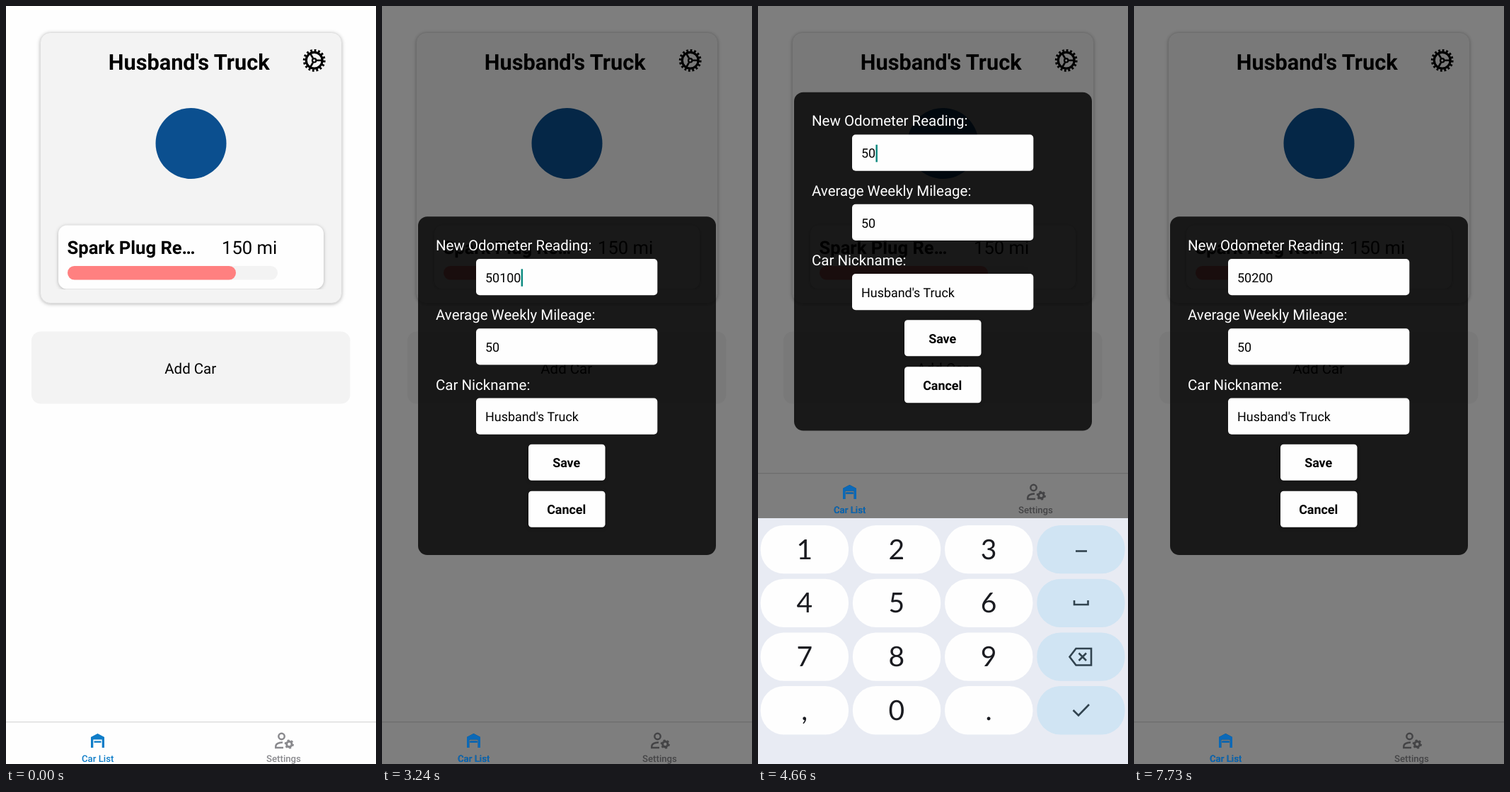
An HTML page for the animation above (8000 ms loop, 523x1070 px).

```html
<!DOCTYPE html>
<html lang="en">
<head>
<meta charset="utf-8">
<title>Car list</title>
<style>
html, body { margin: 0; width: 100%; height: 100%; overflow: hidden; background: #fefefe; }
svg { display: block; width: 100%; height: 100%; font-family: Roboto, sans-serif; text-rendering: geometricPrecision; }
.bold { font-weight: 700; }
.mid { text-anchor: middle; }
.line { fill: none; stroke: currentColor; }
.card { filter: drop-shadow(0 1.5px 2.5px #0004); }
.tab { font-size: 13.2px; font-weight: 500; fill: currentColor; }
.digit { font: 39px Lato, sans-serif; fill: #1a1b20; }
</style>
</head>
<body>
<svg viewBox="0 0 523 1070">
  <defs>
    <clipPath id="listClip"><rect x="68" y="300" width="387" height="100"/></clipPath>
    <g id="garage" class="tab mid">
      <path d="M120 1047V1032L129.5 1027 139 1032V1047H135.7V1035.5H123.3V1047Z"/>
      <path d="M124.5 1037.5h10v2.4h-10z"/>
      <text x="129.7" y="1067.2">Car List</text>
    </g>
  </defs>

  <rect width="523" height="1070" fill="#fefefe"/>
  <rect class="card" x="48.5" y="37.5" width="426" height="382" rx="14" fill="#f3f3f3" stroke="#dedede"/>
  <text class="bold mid" x="258.7" y="89.7" font-size="30.7">Husband's Truck</text>
  <g class="line" transform="translate(435.7 76.8)" stroke-width="3.2">
    <circle r="11.4"/>
    <circle r="14.2" stroke-width="3.4" pathLength="32" stroke-dasharray="1 1"/>
    <circle r="2.7" stroke-width="2.2"/>
    <path d="M3.5 0H11M-1.8 3.1L-5.6 9.7M-1.8 -3.1L-5.6 -9.7" stroke-width="2.6"/>
  </g>
  <circle cx="261.5" cy="194" r="50" fill="#0b4f8f"/>

  <g clip-path="url(#listClip)">
    <rect class="card" x="74" y="309.5" width="375" height="90" rx="12" fill="#fefefe"/>
    <text class="bold" x="86.5" y="350" font-size="25.6">Spark Plug Re…</text>
    <text x="305" y="350" font-size="25.6">150 mi</text>
    <rect x="87" y="367" width="297" height="19.5" rx="9.7" fill="#f3f3f3"/>
    <rect x="87" y="367" width="238" height="19.5" rx="9.7" fill="#ff8080"/>
  </g>

  <rect x="36" y="459.5" width="450.5" height="102" rx="13" fill="#f3f3f3"/>
  <text class="mid" x="260.7" y="518.5" font-size="20.48">Add Car</text>

  <g id="nav">
    <rect y="1010" width="523" height="60" fill="#fefefe"/>
    <rect y="1010" width="523" height="1.4" fill="#dcdcdc"/>
    <use href="#garage" color="#0f7dc8"/>
    <g class="tab mid" color="#8a8a8e">
      <g class="line" stroke-width="2.5">
        <circle cx="389.5" cy="1031" r="4.2"/>
        <path d="M392 1047H381.3V1044.5Q382 1040 391 1039.5"/>
        <circle cx="400.3" cy="1042" r="3.7" stroke-width="3"/>
        <circle cx="400.3" cy="1042" r="5.6" stroke-width="2" pathLength="12" stroke-dasharray="1 1"/>
      </g>
      <text x="392.5" y="1067.2">Settings</text>
    </g>
  </g>

  <rect id="scrim" y="-1" width="523" height="1071" fill="#000" opacity=".5"/>
  <g id="litTab"><use href="#garage" color="#0b69b8"/></g>

  <g id="dialog">
    <rect x="51" width="421" height="477.7" rx="13" fill="#000" opacity=".8"/>
    <g id="form"></g>
    <rect id="caret" y="74" width="2.5" height="24.5" fill="#0b8a80"/>
  </g>

  <g id="keyboard">
    <rect y="723" width="523" height="347" fill="#e8ebf3"/>
    <g id="keys"></g>
    <g class="line" color="#31434f" stroke-width="2.6">
      <path d="M449 769.5H465"/>
      <path d="M447 839V845H466.5V839"/>
      <path d="M449.5 907H471V930.5H449.5L440.5 918.7ZM453.5 913.5L464 924M464 913.5L453.5 924"/>
      <path d="M445.5 994L453 1001.5 468 986"/>
    </g>
  </g>
</svg>
<script>
const $ = id => document.getElementById(id);
const LOOP = 8000, HEIGHT = 1070;

// [time, odometer text]; each entry also restarts the caret blink
const edits = [
  [0, '50100'], [3240, '50100'], [4110, '5010'], [4350, '501'], [4570, '50'],
  [5300, '502'], [5520, '5020'], [5900, '50200']
];
// [key, pressed from, until]
const presses = [
  ['del', 4040, 4190], ['del', 4270, 4430], ['del', 4500, 4660],
  ['2', 5140, 5300], ['0', 5370, 5520], ['0', 5770, 6000]
];

function buildForm() {
  const fields = [['New Odometer Reading:', '50100'], ['Average Weekly Mileage:', '50'], ['Car Nickname:', "Husband's Truck"]];
  const rows = fields.map(([label, value], i) => {
    const y = i * 98.3;
    return `<text x="76" y="${y + 47.7}" font-size="20.48" fill="#fff">${label}</text>
      <rect x="133" y="${y + 59.7}" width="256.3" height="51.2" rx="5" fill="#fefefe"/>
      <text id="field${i}" x="146" y="${y + 92.5}" font-size="17.92">${value}</text>`;
  });
  const buttons = ['Save', 'Cancel'].map((label, i) => {
    const y = 321.5 + i * 66;
    return `<rect class="card" x="207" y="${y}" width="108.5" height="51" rx="4.5" fill="#fefefe"/>
      <text class="bold mid" x="260.7" y="${y + 32.4}" font-size="17.92">${label}</text>`;
  });
  $('form').innerHTML = rows.concat(buttons).join('');
}

function buildKeys() {
  const names = ['1', '2', '3', 'minus', '4', '5', '6', 'space', '7', '8', '9', 'del', ',', '0', '.', 'enter'];
  $('keys').innerHTML = names.map((name, i) => {
    const x = 3.7 + i % 4 * 130.2, y = 733 + (i >> 2) * 75.7;
    const key = `<rect id="key-${name}" x="${x}" y="${y}" width="124.3" height="68.3" rx="33"/>`;
    return name.length > 1 ? key : key + `<text class="digit mid" x="${x + 62}" y="${y + 47.5}">${name}</text>`;
  }).join('');
  return names;
}

const clamp = v => Math.max(0, Math.min(1, v));
const easeOut = v => 1 - (1 - v) ** 2;
const hold = (t, start, step) => start + Math.floor((t - start) / step) * step;
const move = (id, y) => $(id).setAttribute('transform', `translate(0 ${y})`);
const show = (id, on) => $(id).setAttribute('visibility', on ? 'visible' : 'hidden');

function draw(t) {
  const slide = t < 2000 ? 0 : easeOut(clamp((hold(t, 2000, 80) - 1980) / 547));
  const rise = t < 3330 ? 0 : easeOut(clamp((hold(t, 3330, 78) - 3270) / 450));
  const fall = t < 7110 ? 0 : clamp((hold(t, 7110, 78) - 7060) / 310) ** 1.5;
  const lift = t >= 3330 && t < 7110 ? 351 : 0;
  const below = HEIGHT * (1 - slide);

  move('nav', -lift);
  move('litTab', -lift);
  show('litTab', slide === 1);
  move('scrim', below);
  show('scrim', slide > 0);
  move('dialog', 297.3 - lift / 2 + below);
  move('keyboard', 347 * (1 - rise + fall));

  const [since, text] = edits.findLast(e => e[0] <= t);
  $('field0').textContent = text;
  $('caret').setAttribute('x', 146.3 + text.length * 10.06);
  show('caret', t >= 3240 && t < 7400 && (t - since) % 1000 < 500);

  for (const name of keyNames) {
    const down = presses.some(([key, from, to]) => key === name && t >= from && t < to);
    const action = name.length > 1;
    $('key-' + name).setAttribute('fill', action ? (down ? '#c0d2e2' : '#d0e4f3') : (down ? '#e2e5ec' : '#fefefe'));
  }
}

buildForm();
const keyNames = buildKeys();
const began = performance.now();
function tick() {
  draw((performance.now() - began) % LOOP);
  requestAnimationFrame(tick);
}
tick();
</script>
</body>
</html>
```
